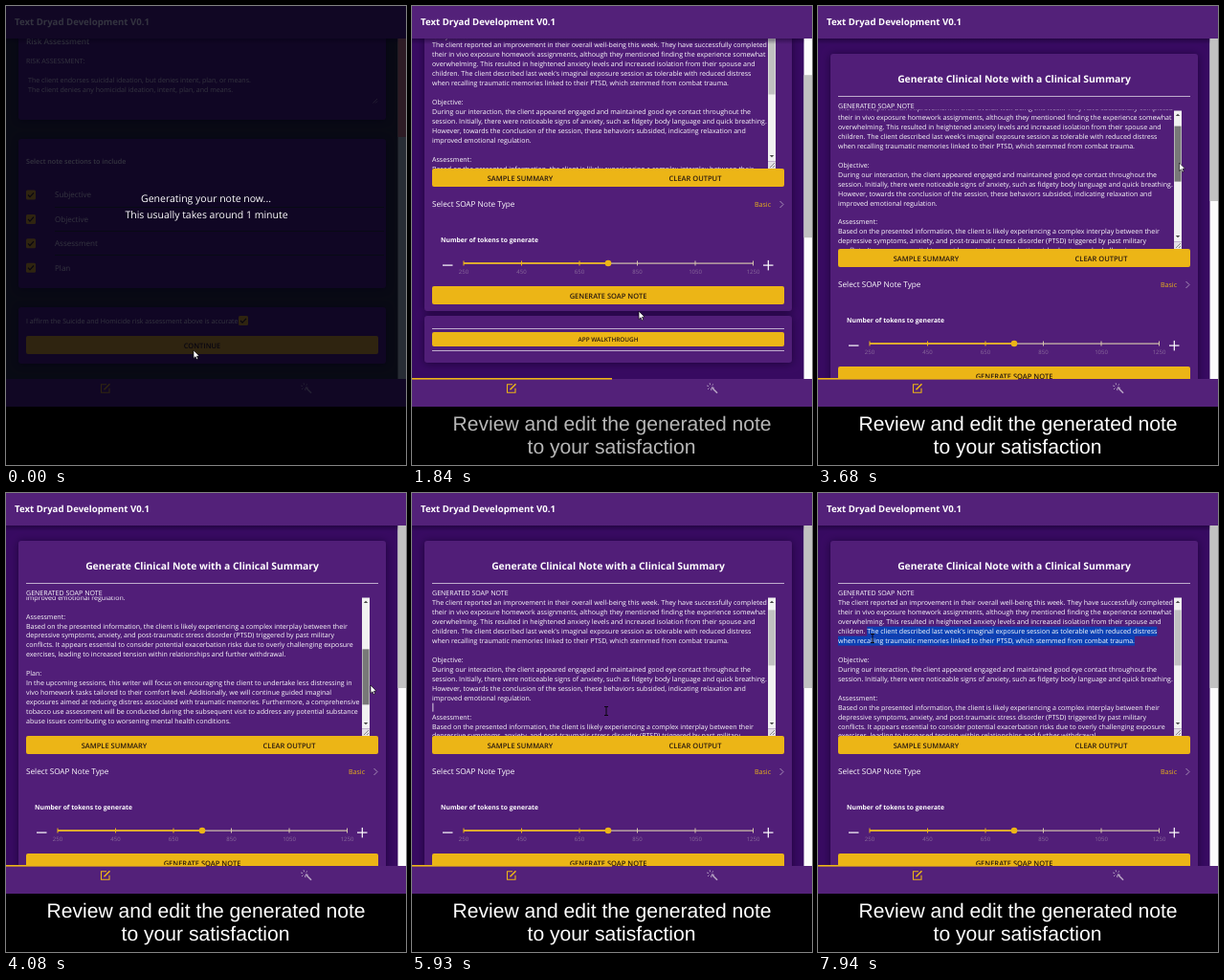
Recreate the animation shown at these times as an HTML page with a canvas. Size 418 by 480 pixels, loop 8 s.

```html
<!DOCTYPE html>
<html lang="en">
<head>
<meta charset="utf-8">
<title>Clinical note demo</title>
<style>
html, body { margin: 0; width: 100%; height: 100%; overflow: hidden; background: #000; }
canvas { display: block; }
</style>
</head>
<body>
<canvas id="stage" width="418" height="480"></canvas>
<script>
const ctx = document.getElementById('stage').getContext('2d');
ctx.textRendering = 'geometricPrecision';

const LOOP = 8000;
const SANS = '"Open Sans", "Noto Sans", sans-serif';
const BAR = '#532179', PAGE = '#370a61', CARD = '#511e78', GOLD = '#ecb516';
const WHITE = '#fff', INK = '#2a1a10', RULE = '#bfaccd';
const LINE = 9.93, TOP = 34, BOTTOM = 390;

const NOTE = [
  ' Subjective:',
  'The client reported an improvement in their overall well-being this week. They have successfully completed',
  'their in vivo exposure homework assignments, although they mentioned finding the experience somewhat',
  'overwhelming. This resulted in heightened anxiety levels and increased isolation from their spouse and',
  "children. The client described last week's imaginal exposure session as tolerable with reduced distress",
  'when recalling traumatic memories linked to their PTSD, which stemmed from combat trauma.',
  '',
  'Objective:',
  'During our interaction, the client appeared engaged and maintained good eye contact throughout the',
  'session. Initially, there were noticeable signs of anxiety, such as fidgety body language and quick breathing.',
  'However, towards the conclusion of the session, these behaviors subsided, indicating relaxation and',
  'improved emotional regulation.',
  '',
  'Assessment:',
  'Based on the presented information, the client is likely experiencing a complex interplay between their',
  'depressive symptoms, anxiety, and post-traumatic stress disorder (PTSD) triggered by past military',
  'conflicts. It appears essential to consider potential exacerbation risks due to overly challenging exposure',
  'exercises, leading to increased tension within relationships and further withdrawal.',
  '',
  'Plan:',
  'In the upcoming sessions, this writer will focus on encouraging the client to undertake less distressing in',
  'vivo homework tasks tailored to their comfort level. Additionally, we will continue guided imaginal',
  'exposures aimed at reducing distress associated with traumatic memories. Furthermore, a comprehensive',
  'tobacco use assessment will be conducted during the subsequent visit to address any potential substance',
  'abuse issues contributing to worsening mental health conditions.'
];
const EDITED = NOTE.filter((_, i) => i !== 10 && i !== 11);

// Keyframes: [time, value, ...]
const PAGE_SCROLL = [[2320, 84], [2640, 48], [2720, 25], [2880, 0]];
const NOTE_SCROLL = [[3560, 0], [3680, 18], [4080, 115], [4240, 115], [4800, 10]];
const MOUSE = [
  [1640, 196, 360], [2240, 318.5, 238], [2880, 318.5, 238], [3440, 377, 157], [3560, 377, 157],
  [3680, 377.5, 164], [4080, 381, 201], [4240, 381, 201], [4800, 378, 160], [5210, 378, 160],
  [5290, 390, 170], [5450, 385, 180], [5850, 203, 228], [6330, 203, 228], [6810, 24, 206],
  [6970, 24, 206], [7370, 329, 156], [7580, 329, 156], [7940, 57, 152]
];
const CAPTION = [[1640, 0], [1920, 1]];
const VEIL = [[1040, 1], [1120, 0.6], [1200, 0.16], [1400, 0]];

function at(keys, t) {
  const n = keys.findIndex(k => k[0] > t);
  if (n === 0) return keys[0].slice(1);
  if (n < 0) return keys[keys.length - 1].slice(1);
  const a = keys[n - 1], b = keys[n], p = (t - a[0]) / (b[0] - a[0]);
  return a.slice(1).map((v, i) => v + (b[i + 1] - v) * p);
}

function rect(x, y, w, h, color) {
  ctx.fillStyle = color;
  ctx.fillRect(x, y, w, h);
}

function box(x, y, w, h, r, color) {
  ctx.fillStyle = color;
  ctx.beginPath();
  ctx.roundRect(x, y, w, h, r);
  ctx.fill();
}

function stroke(points, color, width = 1) {
  ctx.strokeStyle = color;
  ctx.lineWidth = width;
  ctx.beginPath();
  points.forEach(([x, y], i) => i ? ctx.lineTo(x, y) : ctx.moveTo(x, y));
  ctx.stroke();
}

// y is the middle of the capitals
function text(s, x, y, size = 7.05, { color = WHITE, weight = 400, align = 'left', font = SANS } = {}) {
  ctx.font = `${weight} ${size}px ${font}`;
  ctx.textAlign = align;
  ctx.fillStyle = color;
  ctx.fillText(s, x, y + size * 0.36);
}

function clip(x, y, w, h, draw) {
  ctx.save();
  ctx.beginPath();
  ctx.rect(x, y, w, h);
  ctx.clip();
  draw();
  ctx.restore();
}

function card(y, h) {
  ctx.save();
  ctx.shadowColor = 'rgba(10,0,25,.55)';
  ctx.shadowBlur = 9;
  ctx.shadowOffsetY = 1;
  box(13, y, 384, h, 3, CARD);
  ctx.restore();
}

function button(y, h, labels, size = 7.5) {
  box(21, y, 368, h, 2, GOLD);
  for (const [s, x] of labels) {
    text(s, x, y + h / 2 + 0.3, size, { color: INK, weight: 600, align: 'center' });
  }
}

function checkbox(x, y) {
  box(x, y, 10, 10, 1.5, GOLD);
  stroke([[x + 2, y + 5], [x + 4, y + 7.2], [x + 8, y + 2.8]], INK, 1.2);
}

function triangle(x, y, dir) {
  ctx.fillStyle = '#444';
  ctx.beginPath();
  ctx.moveTo(x - 2.2, y + dir);
  ctx.lineTo(x + 2.2, y + dir);
  ctx.lineTo(x, y - 1.3 * dir);
  ctx.fill();
}

function riskPage() {
  rect(0, TOP, 418, BOTTOM - TOP, '#2a3028');
  card(-20, 139);
  text('Risk Assessment', 21, 37, 8.3, { weight: 600 });
  text('RISK ASSESSMENT:', 21, 57);
  text('The client endorses suicidal ideation, but denies intent, plan, or means.', 23, 77);
  text('The client denies any homicidal ideation, intent, plan, and means.', 23, 87);
  stroke([[383.5, 101.5], [388, 97]], RULE, 0.8);
  stroke([[386, 101.5], [388, 99.5]], RULE, 0.8);

  card(139, 156);
  text('Select note sections to include', 21, 162, 7.15, { weight: 600 });
  ['Subjective', 'Objective', 'Assessment', 'Plan'].forEach((s, i) => {
    const y = 197.5 + i * 25.4;
    checkbox(21, y - 5);
    text(s, 51, y, 8.05);
    if (i < 3) rect(51, Math.round(y + 12), 344, 1, '#2a3028');
  });

  card(315, 59);
  text('I affirm the Suicide and Homicide risk assessment above is accurate', 21, 329);
  checkbox(243, 324);
  button(345, 19, [['CONTINUE', 205]]);

  rect(409.5, TOP, 8.5, BOTTOM - TOP, '#c4dcc8');
  rect(409.5, TOP, 8.5, 103, '#e08878');
}

function highlight(from, x0, to, x1, top) {
  ctx.font = `400 7.05px ${SANS}`;
  for (let i = from; i <= to; i++) {
    const a = i === from ? x0 : 21;
    const b = i === to ? x1 : 21 + ctx.measureText(NOTE[i]).width;
    rect(a, top + i * LINE - 5, b - a, LINE, '#0b41b4');
  }
}

function selection(t, top) {
  if (t >= 6330 && t < 6970) {
    const p = Math.min(1, (t - 6330) / 440);
    if (p < 0.45) highlight(11, 124 - p / 0.45 * 103, 11, 124, top);
    else highlight(10, 340 - (p - 0.45) / 0.55 * 319, 11, 124, top);
  } else if (t >= 7600) {
    const p = Math.min(1, (t - 7600) / 320);
    ctx.font = `400 7.05px ${SANS}`;
    const start = 21 + ctx.measureText('children. ').width;
    const end = 21 + ctx.measureText(NOTE[5]).width;
    if (p < 0.6) highlight(5, end - p / 0.6 * 240, 5, end, top);
    else highlight(4, start + (1 - p) / 0.4 * 60, 5, end, top);
  }
}

function noteBox(t) {
  const [scroll] = at(NOTE_SCROLL, t);
  const top = 115 - scroll;
  clip(20, 108.5, 369, 145.5, () => {
    selection(t, top);
    (t < 6970 ? NOTE : EDITED).forEach((s, i) => text(s, 21, top + i * LINE));
    if (t >= 5850 && t < 6330) rect(21.5, top + 12 * LINE - 4.5, 0.8, 9, WHITE);
  });
  rect(372, 109.5, 8, 137, '#f1f1f1');
  triangle(376, 114, 1);
  triangle(376, 241, -1);
  rect(372.5, 118.5 + scroll * 0.39, 7, 58, t > 3520 && t < 4800 ? '#787878' : '#c1c1c1');
  rect(372, 246.5, 8, 7.5, '#e3dfe6');
  stroke([[374, 253], [379, 248]], '#777', 0.8);
  stroke([[377, 253], [379, 251]], '#777', 0.8);
}

function slider() {
  text('Number of tokens to generate', 30, 328.5, 6.75, { weight: 700 });
  rect(32, 354.5, 10.5, 1.2, WHITE);
  rect(367, 354.5, 10.5, 1.2, WHITE);
  rect(371.7, 349.9, 1.2, 10.5, WHITE);
  rect(54, 352.5, 302, 1.2, '#d3c3ac');
  rect(54, 352.2, 151, 1.6, GOLD);
  for (let i = 0; i < 6; i++) {
    const x = 54 + i * 60.5;
    rect(x - 0.5, 350.5, 1, 5, i < 3 ? GOLD : '#d3c3ac');
    text(String(250 + i * 200), x, 362, 6, { color: '#8a6a9c', align: 'center' });
  }
  ctx.fillStyle = GOLD;
  ctx.beginPath();
  ctx.arc(205, 353, 3.3, 0, Math.PI * 2);
  ctx.fill();
}

function notePage(t) {
  const [offset] = at(PAGE_SCROLL, t);
  ctx.save();
  ctx.translate(0, -offset);
  card(50, 353);
  text('Generate Clinical Note with a Clinical Summary', 205, 76.5, 10.35, { weight: 700, align: 'center' });
  rect(21, 94, 368, 1, RULE);
  text('GENERATED SOAP NOTE', 21, 104);
  noteBox(t);
  button(254, 19, [['SAMPLE SUMMARY', 113], ['CLEAR OUTPUT', 296]]);
  text('Select SOAP Note Type', 21, 291.5, 8.2);
  text('Basic', 375, 291.5, 7.05, { color: GOLD, align: 'right' });
  stroke([[384.5, 288], [388, 291.5], [384.5, 295]], '#a78fb8', 1);
  slider();
  button(377, 19, [['GENERATE SOAP NOTE', 205]]);

  card(408, 49);
  rect(21, 421, 368, 1, RULE);
  button(425, 15, [['APP WALKTHROUGH', 205]], 6.4);
  rect(21, 444, 368, 1, RULE);
  ctx.restore();

  rect(409.5, TOP, 8.5, BOTTOM - TOP, '#fcfcfc');
  rect(409.5, TOP + offset * 0.455, 8.5, 170, '#c1c1c1');
}

function editIcon(x, y) {
  stroke([[x + 1, y - 4], [x - 4.5, y - 4], [x - 4.5, y + 4.5], [x + 4, y + 4.5], [x + 4, y]], GOLD, 1.1);
  stroke([[x - 1.5, y + 1.5], [x + 4.5, y - 4.5]], GOLD, 1.6);
}

function wandIcon(x, y) {
  const c = '#b7a4c4';
  stroke([[x - 1, y - 1], [x + 5, y + 5]], c, 1.6);
  for (let i = 0; i < 6; i++) {
    const a = i * Math.PI / 3 + 2.4;
    const dx = Math.cos(a), dy = Math.sin(a);
    stroke([[x - 2 + dx * 2, y - 1.5 + dy * 2], [x - 2 + dx * 4, y - 1.5 + dy * 4]], c, 0.9);
  }
}

function frameBars(loading) {
  const shade = ctx.createLinearGradient(0, TOP, 0, TOP + 6);
  shade.addColorStop(0, 'rgba(15,0,35,.45)');
  shade.addColorStop(1, 'rgba(15,0,35,0)');
  rect(0, TOP, 409.5, 6, shade);
  rect(0, 0, 418, TOP, BAR);
  text('Text Dryad Development V0.1', 9, 17, 9.65, { weight: 700 });
  rect(0, BOTTOM, 418, 419 - BOTTOM, BAR);
  if (!loading) rect(0, BOTTOM - 1, 209, 1.6, GOLD);
  editIcon(104, 399.7);
  wandIcon(314, 399.7);
}

function arrow(x, y) {
  ctx.beginPath();
  [[0, 0], [0, 8.4], [2, 6.7], [3.3, 9.6], [4.7, 9], [3.4, 6.2], [6, 6]]
    .forEach(([dx, dy]) => ctx.lineTo(x + dx, y + dy));
  ctx.closePath();
  ctx.fillStyle = '#fff';
  ctx.fill();
  ctx.strokeStyle = '#000';
  ctx.lineWidth = 0.6;
  ctx.stroke();
}

function beam(x, y) {
  const c = '#0b0410';
  stroke([[x, y - 4.5], [x, y + 4.5]], c, 1);
  stroke([[x - 2, y - 4.5], [x + 2, y - 4.5]], c, 1);
  stroke([[x - 2, y + 4.5], [x + 2, y + 4.5]], c, 1);
}

function veil(t) {
  const [a] = at(VEIL, t);
  if (!a) return;
  rect(0, 0, 418, 419, `rgba(0,0,16,${a * 0.8})`);
  const style = { color: `rgba(255,255,255,${a * a})`, align: 'center' };
  text('Generating your note now...', 209, 201.3, 10.5, style);
  text('This usually takes around 1 minute', 209.5, 218, 10.5, style);
}

function caption(t) {
  const [a] = at(CAPTION, t);
  if (!a) return;
  const style = { color: `rgba(255,255,255,${a})`, align: 'center', font: '"Liberation Sans", Arial, sans-serif' };
  text('Review and edit the generated note', 209, 436.4, 21.1, style);
  text('to your satisfaction', 208.5, 460.4, 21.1, style);
}

function draw(t) {
  const loading = t < 1100;
  rect(0, 0, 418, 480, '#000');
  rect(0, 0, 418, 419, PAGE);
  clip(0, TOP, 418, BOTTOM - TOP, () => loading ? riskPage() : notePage(t));
  frameBars(loading);
  veil(t);
  caption(t);
  const [x, y] = at(MOUSE, t);
  if (t > 5450 && x < 371) beam(x, y);
  else arrow(x, y);
}

const begin = performance.now();
function tick() {
  draw((performance.now() - begin) % LOOP);
  requestAnimationFrame(tick);
}
tick();
</script>
</body>
</html>
```
